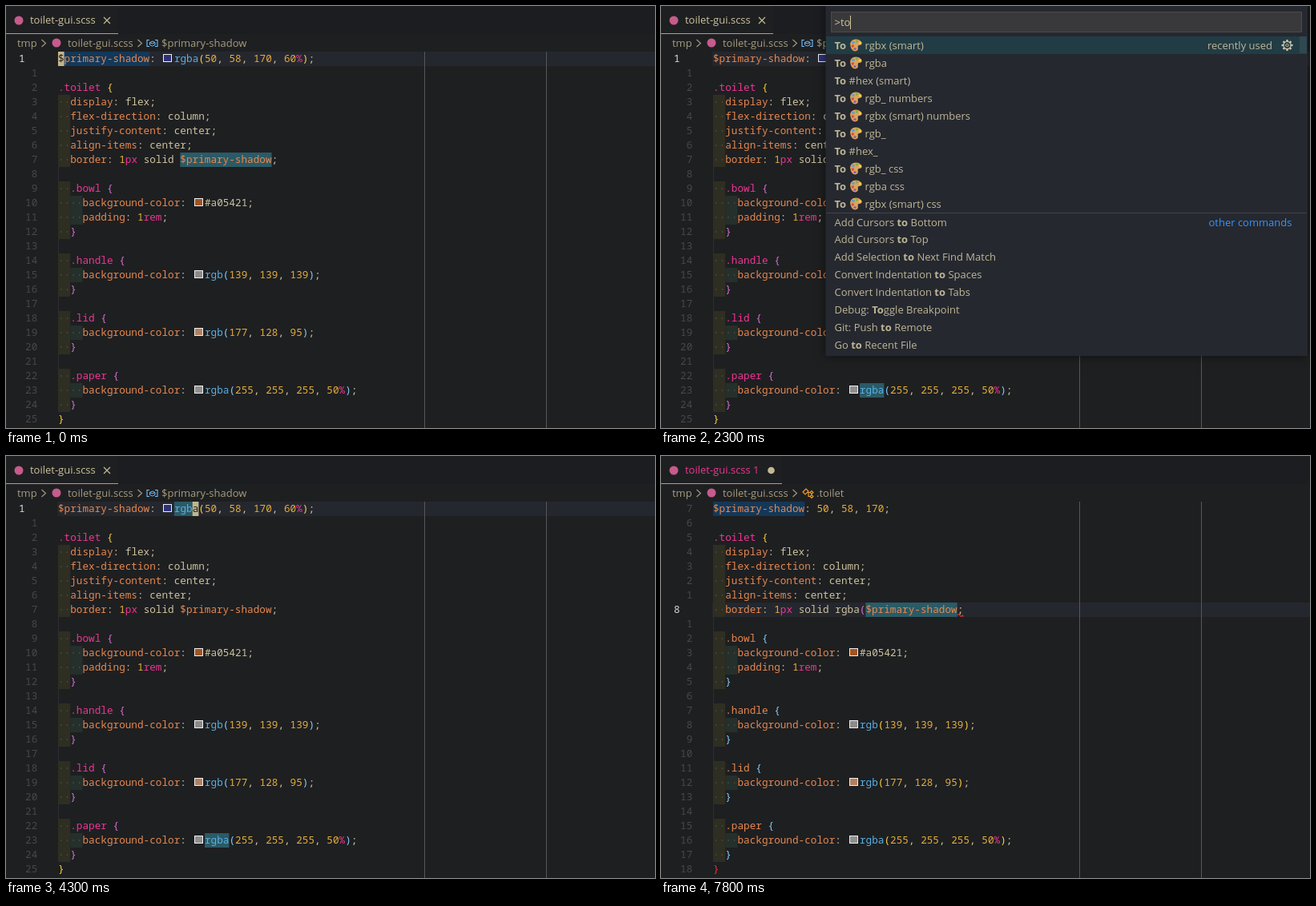
Animation of 810 by 527 pixels, one loop 8 s. Source, as an HTML page:

```html
<!DOCTYPE html>
<html lang="en">
<head>
<meta charset="utf-8">
<title>SCSS editor</title>
<style>
html, body { margin: 0; width: 810px; height: 527px; overflow: hidden; background: #1e1f21; }
svg { display: block; }
text { white-space: pre; }
.ui { font: 13px "Open Sans", "Noto Sans", sans-serif; }
.code { font: 500 12.7px "Noto Sans Mono", "DejaVu Sans Mono", monospace; }
.b { font-weight: 700; }
.panel { filter: drop-shadow(0 0 7px rgba(0, 0, 0, .5)); }
</style>
</head>
<body>
<svg id="stage" width="810" height="527" viewBox="0 0 810 527"></svg>
<script>
const LOOP = 8000, LEFT = 65, TOP = 57, LH = 18, CW = 7.617, SWATCH = 15.4;
const C = {
  bg: '#1e1f21', band: '#25272e', text: '#cdc39d', dim: '#a59d80', orange: '#e6884f',
  pink: '#ec3694', num: '#e5ae3a', fn: '#58b0e6', teal: '#2b5a66', write: '#12385a',
  cursor: '#c3b58c', panel: '#25282f', pick: '#223c45', red: '#f03030'
};
const BRACKETS = ['#ffd23c', '#d670d6', '#87cefa'];

// "@" stands for a colour swatch
const SOURCE = `$primary-shadow: @rgba(50, 58, 170, 60%);

.toilet {
  display: flex;
  flex-direction: column;
  justify-content: center;
  align-items: center;
  border: 1px solid $primary-shadow;

  .bowl {
    background-color: @#a05421;
    padding: 1rem;
  }

  .handle {
    background-color: @rgb(139, 139, 139);
  }

  .lid {
    background-color: @rgb(177, 128, 95);
  }

  .paper {
    background-color: @rgba(255, 255, 255, 50%);
  }
}`.split('\n');

// "~" stands for the paint palette emoji
const RECENT = ['To ~rgbx (smart)', 'To ~rgba', 'To #hex (smart)', 'To ~rgb_ numbers',
  'To ~rgbx (smart) numbers', 'To ~rgb_', 'To #hex_', 'File Utils: Duplicate',
  'Developer: Reload Window', 'To ~rgb_ css', 'To ~rgba css', 'To ~rgbx (smart) css',
  'File Utils: Rename', 'File: Reveal Active File in Side Bar', 'Live Sass: Watch Sass',
  'File Utils: Delete', 'Save All', 'Extensions: Refresh'];
const OTHER = ['Add Cursors to Bottom', 'Add Cursors to Top', 'Add Selection to Next Find Match',
  'Convert Indentation to Spaces', 'Convert Indentation to Tabs', 'Debug: Toggle Breakpoint',
  'Git: Push to Remote', 'Go to Recent File', 'Go to References', 'Move Cursor to Row Start',
  'Move Panel to Right', 'Reset to Recommended', 'Return to Root Folder', 'Scroll to Row',
  'Send Selection to REPL', 'To ~rgba numbers', 'View: Close Editors to the Right in Group'];

const border = value => `  border: 1px solid ${value};`;

// Each step changes part of the state
const STEPS = [
  [0, { row: 0, col: 0, caret: 'block', mark: 'var', crumb: 'var', first: SOURCE[0], border: SOURCE[7],
        dirty: false, error: false, scope: false, query: null, hints: null, fade: false }],
  [100, { col: 4 }],
  [500, { col: 9 }],
  [700, { col: 12 }],
  [800, { col: 15 }],
  [1000, { col: 17, mark: '' }],
  [1200, { col: 21, mark: 'fn' }],
  [1500, { col: 20 }],
  [1900, { query: '', caret: '' }],
  [2000, { query: 't' }],
  [2300, { query: 'to' }],
  [2800, { query: 'tor' }],
  [3100, { query: 'torg' }],
  [3500, { query: 'torgb' }],
  [3600, { query: 'torgbn' }],
  [3900, { query: 'torgbnu' }],
  [4000, { query: 'torgbnum' }],
  [4300, { query: null, caret: 'block' }],
  [4400, { first: '$primary-shadow: @50, 58, 170;', mark: '', dirty: true }],
  [4800, { first: '$primary-shadow: 50, 58, 170;', row: 1, col: 0 }],
  [5100, { row: 2, col: 8, crumb: 'dots', scope: true }],
  [5300, { row: 3, col: 15 }],
  [5400, { row: 4, col: 20 }],
  [5500, { row: 5 }],
  [5700, { row: 6 }],
  [5800, { row: 7 }],
  [6100, { mark: 'var', crumb: 'class' }],
  [6200, { caret: 'line' }],
  [6700, { border: border('rgb$primary-shadow'), col: 22, mark: '', hints: ['rgb', 'rgba'], fade: true }],
  [6900, { col: 23, fade: false }],
  [7000, { border: border('rgba$primary-shadow'), col: 24, hints: ['rgba'] }],
  [7300, { border: border('rgba($primary-shadow'), col: 25, hints: null, scope: false }],
  [7600, { mark: 'var' }],
  [7800, { error: true, caret: '' }]
];
let last = {};
const STATES = STEPS.map(([at, change]) => ({ at, ...(last = { ...last, ...change }) }));

const pen = document.createElement('canvas').getContext('2d');
const uiWidth = s => {
  pen.font = '13px "Open Sans", "Noto Sans", sans-serif';
  return pen.measureText(s).width;
};
const rect = (x, y, w, h, fill, more = '') =>
  `<rect x="${x}" y="${y}" width="${w}" height="${h}" fill="${fill}" ${more}/>`;
const line = (d, stroke, w = 1) => `<path d="${d}" fill="none" stroke="${stroke}" stroke-width="${w}"/>`;
const text = (x, y, s, fill, cls = 'ui', more = '') =>
  `<text x="${x}" y="${y}" class="${cls}" fill="${fill}" ${more}>${s}</text>`;
const dot = (x, y, r, fill) => `<circle cx="${x}" cy="${y}" r="${r}" fill="${fill}"/>`;
const rowTop = r => TOP + LH * r;

function colX(src, col) {
  const at = src.indexOf('@');
  return LEFT + col * CW + (at >= 0 && col >= at ? SWATCH : 0);
}

const TOKEN = /\$[\w-]+|\.[a-z]+|[a-z-]+(?=:)|[a-z]+(?=\(\d)|#\w+|\d+|%|px|rem|[(){}]|[\w-]+|[:;,]/g;

function tokenColor(tok, next, row, broken) {
  if (tok[0] === '$') return C.orange;
  if (tok[0] === '.') return broken && row > 7 ? C.orange : C.pink;
  if (/^\d/.test(tok)) return C.num;
  if (/^(%|px|rem)$/.test(tok)) return C.pink;
  if (/^[a-z]/.test(tok) && next === ':') return C.orange;
  if (/^rgba?$/.test(tok) && /\(\d/.test(next + 0) && next === '(' && row !== 7) return C.fn;
  return C.text;
}

function bracketColor(tok, stack) {
  if (tok === '(' || tok === '{') {
    stack.push(tok);
    return BRACKETS[(stack.length - 1) % 3];
  }
  if (stack[stack.length - 1] !== (tok === ')' ? '(' : '{')) return C.red;
  stack.pop();
  return BRACKETS[stack.length % 3];
}

function swatch(src, row) {
  const at = src.indexOf('@');
  if (at < 0) return '';
  const value = src.slice(at + 1, -1);
  const fill = /^\d/.test(value) ? `rgb(${value})` : value;
  const x = Math.round(LEFT + at * CW + 2) + .5;
  return rect(x, rowTop(row) + 3.5, 10, 9, fill, 'stroke="#eeeeee"');
}

function codeRow(src, row, stack, broken) {
  const plain = src.replace('@', ''), y = rowTop(row) + 13;
  const indent = src.search(/\S|$/);
  let out = '';
  for (let i = 0; i < indent; i++) out += dot(LEFT + (i + .5) * CW, y - 4, .7, '#5d5d4c');
  for (const m of plain.matchAll(TOKEN)) {
    const tok = m[0];
    const color = /[(){}]/.test(tok) ? bracketColor(tok, stack)
      : tokenColor(tok, plain[m.index + tok.length], row, broken);
    out += text(colX(src, m.index), y, tok, color, 'code');
  }
  return out + swatch(src, row);
}

function highlights(s, lines) {
  const mark = (row, word, fill) => {
    const col = lines[row].replace('@', '').indexOf(word);
    return rect(colX(lines[row], col), rowTop(row), word.length * CW, LH, fill);
  };
  if (s.mark === 'var') return mark(0, '$primary-shadow', C.write) + mark(7, '$primary-shadow', C.teal);
  if (s.mark === 'fn') return mark(0, 'rgba', C.teal) + mark(23, 'rgba', C.teal);
  return '';
}

function caret(s, src) {
  const x = colX(src, s.col), y = rowTop(s.row);
  let out = s.fade ? rect(x, y, CW, LH, C.band, 'opacity=".6"') : '';
  if (s.caret === 'line') out += rect(x, y, 2, LH, C.cursor);
  if (s.caret === 'block') {
    const ch = src.replace('@', '')[s.col] || '';
    out += rect(x, y, CW, LH, C.cursor) + text(x, y + 13, ch, C.bg, 'code');
  }
  return out;
}

function editor(s) {
  const lines = SOURCE.slice();
  lines[0] = s.first;
  lines[7] = s.border;
  const broken = s.border.includes('('), stack = [];
  let out = rect(64, rowTop(s.row), 746, LH, C.band);
  out += rect(LEFT, rowTop(3), 1, LH * 22, '#2d2e31');
  lines.forEach((src, r) => {
    const indent = src.search(/\S|$/);
    if (indent) out += rect(LEFT, rowTop(r), 2 * CW, LH, '#2e2f22');
    if (indent > 2) out += rect(LEFT + 2 * CW, rowTop(r), 2 * CW, LH, '#25302c');
  });
  out += highlights(s, lines);
  lines.forEach((src, r) => {
    const here = r === s.row, y = rowTop(r) + 13;
    out += here ? text(16, y, r + 1, '#dcdcdc', 'code')
      : text(39.3, y, Math.abs(r - s.row), '#47484b', 'code', 'text-anchor="end"');
    out += codeRow(src, r, stack, broken);
  });
  if (s.scope) out += line('M133 110.5H65.5V507.5H72', '#a58c35');
  out += rect(522, TOP, 1, 470, '#56575a') + rect(674, TOP, 1, 470, '#56575a');
  if (s.error) out += line('M370 199q1.5-3 3 0t3 0l1.500 1.500', C.red, 1.2);
  return out + caret(s, lines[s.row]);
}

function header(s) {
  const w = s.error ? 151 : 140, mid = w - 14;
  const chevron = x => line(`M${x - 2.500} 42l5 4.500l-5 4.500`, C.dim, 1.1);
  let out = rect(0, 0, 810, 35, '#1c1d21') + rect(0, 0, w, 35, C.bg) + rect(0, 34, w, 1, '#dc9158');
  out += dot(16, 18, 5.5, '#c65b8c');
  out += text(30, 22, 'toilet-gui.scss' + (s.error ? ' 1' : ''), s.error ? C.pink : C.text);
  out += s.dirty ? dot(s.error ? 137.5 : 126, 18, 4.3, '#c3b995')
    : line(`M${mid - 4} 14l8 8m0-8l-8 8`, '#c3b995', 1.2);
  out += text(14, 51, 'tmp', C.dim) + chevron(47) + dot(63, 46, 5.5, '#c65b8c');
  out += text(77, 51, 'toilet-gui.scss', C.dim) + chevron(167);
  if (s.crumb === 'dots') return out + text(175, 51, '...', C.dim);
  if (s.crumb === 'var') {
    return out + line('M179 42.500h-3v8h3m7-8h3v8h-3', '#75beff', 1.1)
      + line('M179.500 45.500l3.500-1.500l3 1.500v3l-3.500 1.500l-3-1.500zl3 1.500l3.500-1.500', '#75beff', 1)
      + text(194, 51, '$primary-shadow', C.dim);
  }
  return out + line('M177 45l4-4l3 3l-4 4zM183 45.500h3m-2 0v5h2m0-5l2-2l2 2l-2 2zm0 5l2-2l2 2l-2 2z', '#ee9d28', 1.2)
    + text(194, 51, '.toilet', C.dim);
}

// Matches letters in sequence, or else at the next word start
function match(item, query) {
  const low = item.toLowerCase(), hits = new Set();
  let pos = -1;
  for (const ch of query) {
    let i = pos + 1;
    if (pos < 0 || low[i] !== ch) {
      while (i < low.length && !(low[i] === ch && (i === 0 || /[ ~]/.test(low[i - 1])))) i++;
    }
    if (i >= low.length) return null;
    hits.add(pos = i);
  }
  return hits;
}

function emoji(x, y) {
  return `<g transform="translate(${x} ${y})"><path d="M1 1C-1-6 6-9 11-7C17-4 16 0 12 0C9 0 11 3 10 6C7 9 2 7 1 1Z" fill="#dba35b"/>`
    + dot(4.5, -3.500, 1.8, '#5aa0d8') + dot(9, -5, 1.700, '#7cb342') + dot(13, -3, 1.6, '#f4d03f')
    + dot(3.800, 1, 1.700, '#d94f3d') + dot(6.5, 4.5, 1.6, '#8e5ab0') + '</g>';
}

function label(item, hits, mid) {
  const spans = (from, to) => [...item.slice(from, to)].reduce((out, ch, i) => {
    const bold = hits.has(from + i), prev = out[out.length - 1];
    if (prev && prev.bold === bold) prev.s += ch;
    else out.push({ bold, s: ch });
    return out;
  }, []).map(p => p.bold ? `<tspan class="b">${p.s}</tspan>` : p.s).join('');
  const cut = item.indexOf('~'), y = mid + 5, fill = '#bfb696';
  if (cut < 0) return text(216.5, y, spans(0), fill);
  return text(216.5, y, spans(0, cut), fill) + emoji(235.5, mid) + text(254.5, y, spans(cut + 1), fill);
}

function gear(x, y) {
  let out = `<g transform="translate(${x} ${y})">`;
  for (let a = 0; a < 360; a += 45) out += rect(-1.2, -7, 2.4, 3, '#c9c2a6', `transform="rotate(${a})"`);
  return out + '<circle r="4.6" fill="none" stroke="#c9c2a6" stroke-width="1.200"/><circle r="1.700" fill="none" stroke="#c9c2a6"/></g>';
}

function keys(mid) {
  const key = (x, w, s) => rect(x + .5, mid - 8.5, w, 16, '#32353c', 'rx="3" stroke="#40434a"')
    + text(x + w / 2 + .5, mid + 4, s, '#c9c2a6', 'ui', 'text-anchor="middle" style="font-size:11px"');
  return key(727, 28, 'Ctrl') + text(759, mid + 4, '+', '#bfb696', 'ui', 'style="font-size:11px"') + key(768, 19, 'R');
}

function palette(query) {
  const find = list => list.map(item => ({ item, hits: match(item, query) })).filter(o => o.hits);
  const recent = find(RECENT), rows = recent.concat(query ? find(OTHER) : []).slice(0, 18);
  let out = rect(205.5, -10, 601.5, 51 + rows.length * 22 + 6 - 6 + 0, C.panel, 'class="panel"');
  out += rect(212.5, 7.5, 587, 25, '#39393b', 'stroke="#4b4b4b"');
  out += text(216.5, 24.5, '&gt;' + query, C.text) + rect(Math.round(216.5 + uiWidth('>' + query)), 12, 1, 17, C.text);
  out += rect(206, 38, 600, 22, C.pick);
  if (rows.length === 18) out += rect(797, 38, 9, 21, '#304850');
  rows.forEach((o, i) => {
    const mid = 49 + 22 * i;
    if (i === recent.length) {
      out += rect(206, mid - 11, 600, 1, '#41444c');
      out += text(787.5, mid + 6, 'other commands', '#3794ff', 'ui', 'text-anchor="end"');
    }
    out += label(o.item, o.hits, mid + (i === recent.length ? 1 : 0));
    if (o.item.startsWith('Developer')) out += keys(mid);
  });
  return out + text(763, 54, 'recently used', '#bfb696', 'ui', 'text-anchor="end"') + gear(781.5, 49);
}

function hintBox(words, typed) {
  let out = rect(233.5, 201.5, 431, words.length * LH + 3, C.panel, 'stroke="#4a4c51" class="panel"');
  out += rect(234, 202, 430, LH, C.pick);
  words.forEach((w, i) => {
    const y = 215 + LH * i;
    out += text(236.5, y - 1, 'abc', '#c5c5c5', 'ui', 'style="font-size:9px"');
    out += text(256, y, `<tspan class="b">${typed}</tspan>${w.slice(typed.length)}`, '#c6c0a8', 'code');
  });
  return out;
}

function draw(s) {
  let out = rect(0, 0, 810, 527, C.bg) + editor(s) + header(s);
  if (s.hints) out += hintBox(s.hints, s.hints[0]);
  if (s.query !== null) out += palette(s.query);
  return out;
}

const stage = document.getElementById('stage');
const start = performance.now();
let shown = null;

function tick() {
  const t = (performance.now() - start) % LOOP;
  const state = STATES.filter(s => s.at <= t).pop();
  if (state !== shown) stage.innerHTML = draw(shown = state);
  requestAnimationFrame(tick);
}
tick();
</script>
</body>
</html>
```
